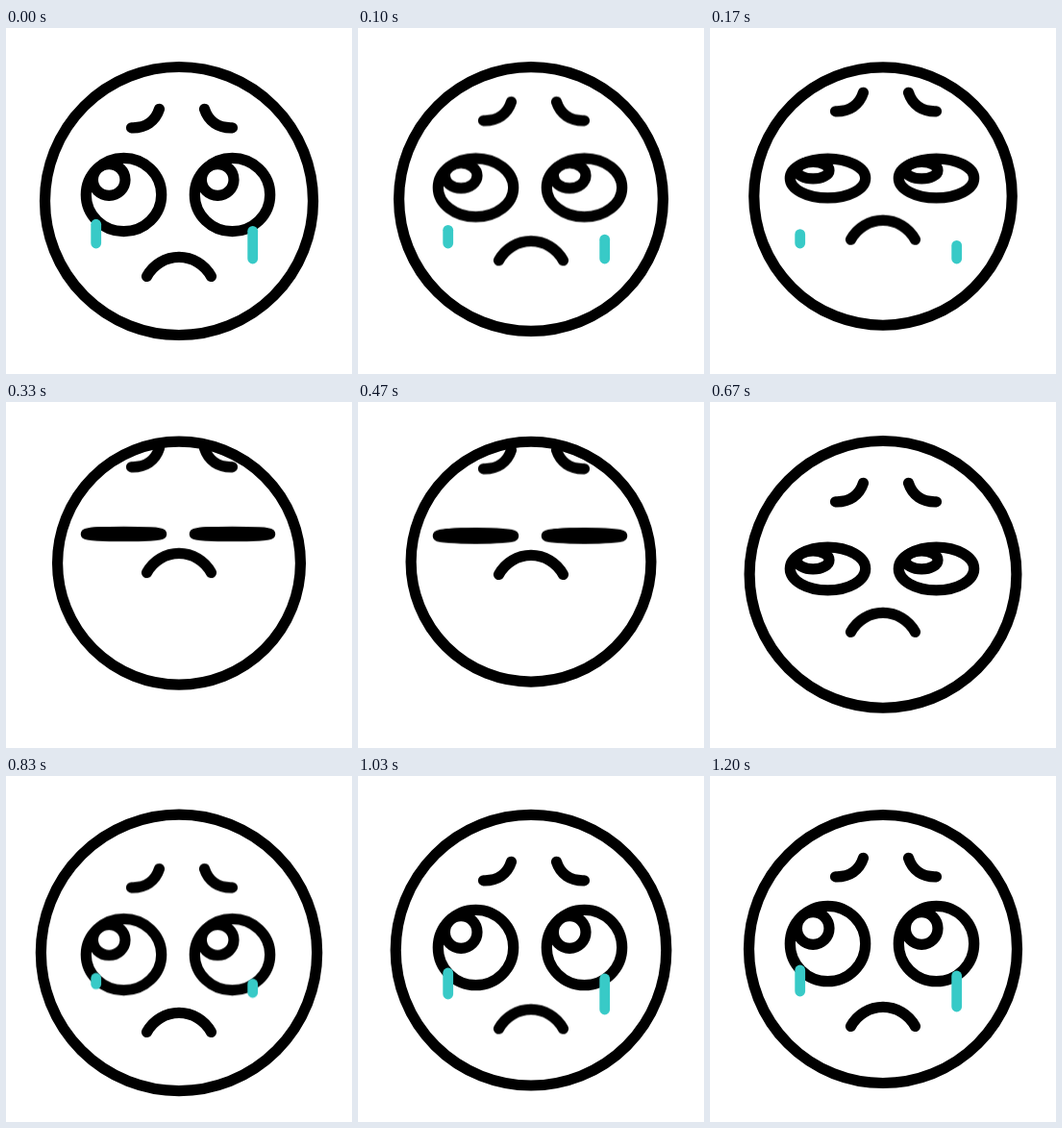
An HTML page without scripts that plays this animation: 360x360 px, repeating every 1.67 s.

```html
<!DOCTYPE html>
<html lang="en">
<head>
<meta charset="utf-8">
<title>Crying face</title>
<style>
  @property --open { syntax: "<number>"; inherits: true; initial-value: 1; }

  html, body { margin: 0; width: 100%; height: 100%; overflow: hidden; background: #fff; }
  svg { display: block; width: 100vw; height: 100vh; }

  .ink { fill: none; stroke: #000; stroke-width: 11.2; stroke-linecap: round; }
  .tear { stroke: #38cac7; stroke-width: 10.8; stroke-linecap: round; stroke-dasharray: 1 3; }
  .ball { ry: calc(39.2px * var(--open)); }
  .pupil { cy: calc(-16px * var(--open)); ry: calc(16.8px * var(--open)); }

  .face, .bob, .mouth, .eyes, .sag, .tear {
    animation: 1670ms cubic-bezier(.333, 0, .667, 1) infinite;
  }
  .face { animation-name: face; }
  .bob { animation-name: bob; }
  .mouth { animation-name: mouth; }
  .eyes { animation-name: squint; }
  .sag { animation-name: sag; }
  .tear { animation-name: tear; }

  @keyframes face {
    0% { cy: 180px; r: 139.5px; }
    25.75% { cy: 165.7px; r: 124.4px; animation-timing-function: cubic-bezier(.42, 0, .62, 1); }
    47.3% { cy: 184px; r: 143.8px; }
    70%, 100% { cy: 180px; r: 139.5px; }
  }
  @keyframes bob {
    0% { transform: translateY(-1px); animation-timing-function: cubic-bezier(.33, .05, .6, 1); }
    24% { transform: translateY(-39.5px); }
    47.9% { transform: translateY(11.5px); }
    70.7%, 100% { transform: none; }
  }
  @keyframes mouth {
    0% { transform: translateY(-2px); animation-timing-function: cubic-bezier(.33, .05, .6, 1); }
    24% { transform: translateY(-88px); }
    49.1% { transform: translateY(6px); }
    71.8%, 100% { transform: none; }
  }
  @keyframes squint {
    0% { --open: .975; animation-timing-function: cubic-bezier(.33, .05, .6, 1); }
    23%, 24% { --open: .02; }
    53.9%, 100% { --open: 1; }
  }
  @keyframes sag {
    0%, 43% { transform: none; }
    47.9% { transform: translateY(8.5px); }
    70.7%, 100% { transform: none; }
  }
  /* Drains from the top, then grows downwards again */
  @keyframes tear {
    0% { stroke-dashoffset: -.1; opacity: 1; animation-timing-function: linear; }
    19.4% { stroke-dashoffset: -1; opacity: 1; }
    19.41% { stroke-dashoffset: 1; opacity: 0; }
    44.3% { stroke-dashoffset: 1; opacity: 0; }
    44.31% { stroke-dashoffset: 1; opacity: 1; }
    59.9%, 100% { stroke-dashoffset: 0; opacity: 1; }
  }
</style>
</head>
<body>
<svg viewBox="0 0 360 360">
  <defs>
    <path id="brow" d="M130.5 104.8C145 105.3 155.5 98 159.5 85.3"/>
  </defs>

  <circle class="ink face" cx="180" cy="180" r="139.5"/>
  <g class="ink bob">
    <use href="#brow"/>
    <use href="#brow" transform="matrix(-1 0 0 1 366 0)"/>
    <g class="eyes">
      <g transform="translate(122.5 174.5)">
        <ellipse class="ball" rx="39.2" ry="39.2"/>
        <ellipse class="pupil" cx="-15.3" cy="-16" rx="16.8" ry="16.8"/>
      </g>
      <g transform="translate(235.5 174.5)">
        <ellipse class="ball" rx="39.2" ry="39.2"/>
        <ellipse class="pupil" cx="-15.3" cy="-16" rx="16.8" ry="16.8"/>
      </g>
    </g>
  </g>
  <path class="ink mouth" d="M146.5 260.5A38 38 0 0 1 213.5 260.5"/>
  <g class="sag">
    <path class="tear" pathLength="1" d="M93.7 202V224"/>
    <path class="tear" pathLength="1" d="M256.7 208V240"/>
  </g>
</svg>
</body>
</html>
```
